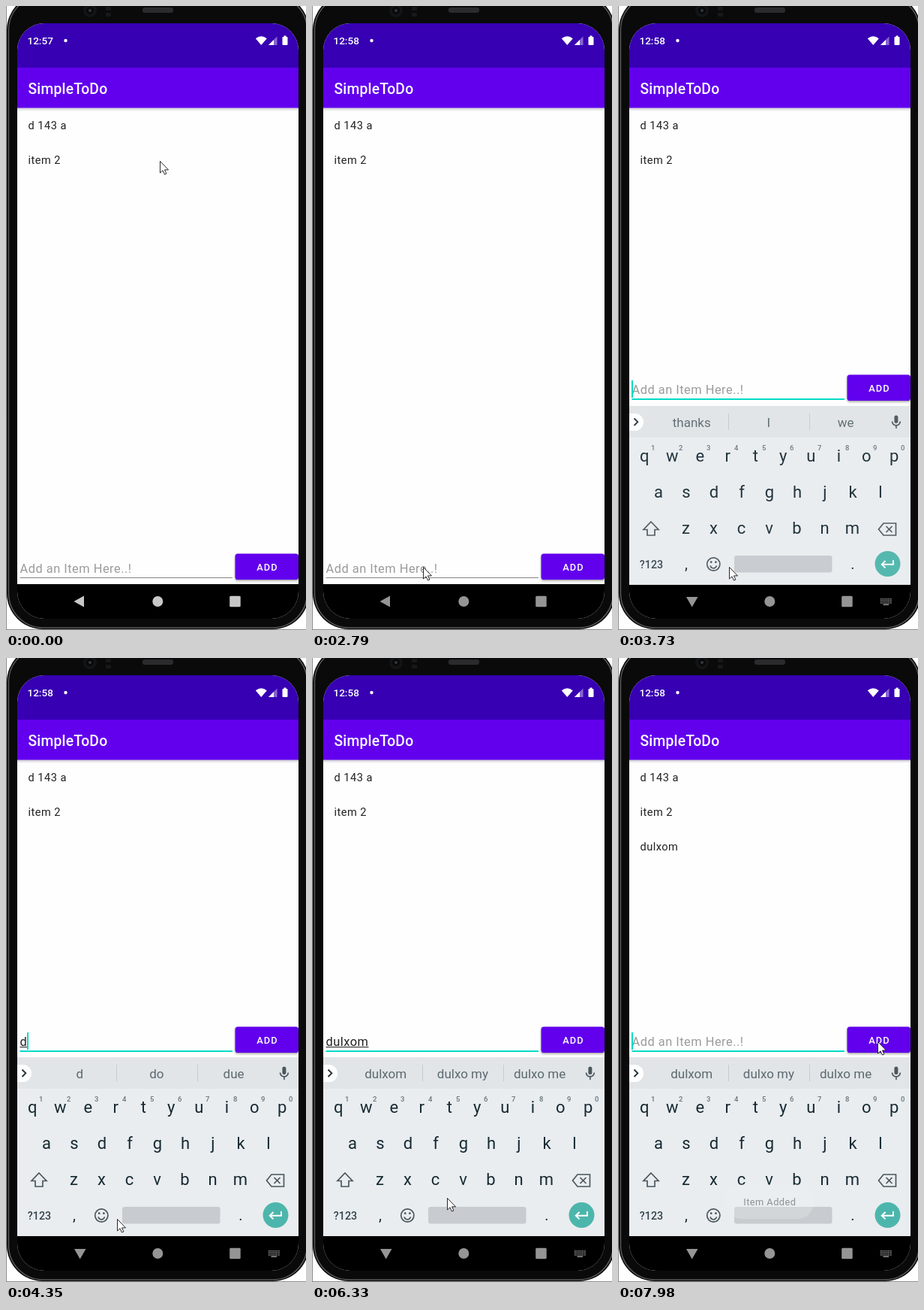
An HTML page with a canvas that plays this animation: 400 px wide and 830 px high, repeating every 8000 ms.

```html
<!DOCTYPE html>
<html lang="en">
<head>
<meta charset="utf-8">
<title>To-do demo</title>
<style>
  html, body { margin: 0; width: 100%; height: 100%; overflow: hidden; background: #fff; }
  canvas { display: block; width: 400px; height: 830px; }
</style>
</head>
<body>
<canvas id="stage"></canvas>
<script>
const LOOP = 8000, W = 400, H = 830;
const PURPLE = '#6200ee', TEAL = '#03dac5', INK = '#172a33', ICON = '#4b575e';
const WORD = 'dulxom', NAME = 'Dulxo';
const FOCUS = 3320, LIFT = 3450, NAV_SWAP = 3590, KEYBOARD = 3730, SETTLED = 3850;
const TYPE_START = 4350, KEY_GAP = 257, BLINK = 475, PRESS = 7600, ADDED = 7740;

const canvas = document.getElementById('stage');
const c = canvas.getContext('2d');
const dpr = window.devicePixelRatio || 1;
canvas.width = W * dpr;
canvas.height = H * dpr;

const pointerStart = [205, 206];
const pointerLegs = [
  { start: 880, end: 1820, steps: 8, via: [145, 560], to: [145, 725] },
  { start: 2100, end: 2370, steps: 3, via: [147, 728], to: [148, 731] },
  { start: 2790, end: 2790, steps: 1, via: [148, 738], to: [148, 746] },
  { start: 6330, end: 7080, steps: 7, via: [445, 485], to: [346, 510] }
];

// Progress in equal jumps: the first lands at start, the last at end.
function stepped(t, start, end, steps) {
  if (t < start) return 0;
  if (t >= end) return 1;
  return (Math.floor((t - start) / (end - start) * (steps - 1)) + 1) / steps;
}

const smooth = p => p * p * (3 - 2 * p);
const curve = (a, b, d, p) => a * (1 - p) ** 2 + 2 * b * p * (1 - p) + d * p * p;

function pointerAt(t) {
  return pointerLegs.reduce((from, leg) => {
    const p = smooth(stepped(t, leg.start, leg.end, leg.steps));
    return from.map((v, i) => Math.round(curve(v, leg.via[i], leg.to[i], p)));
  }, pointerStart);
}

function keysTyped(t) {
  const count = Math.floor((t - TYPE_START) / KEY_GAP) + 1;
  return Math.max(0, Math.min(WORD.length, count));
}

function caretVisible(t) {
  if (t < FOCUS) return false;
  const count = keysTyped(t);
  let last = count ? TYPE_START + KEY_GAP * (count - 1) : FOCUS;
  if (t >= ADDED) last = ADDED;
  return Math.floor((t - last) / BLINK) % 2 === 0;
}

function suggestionsFor(count) {
  const typed = WORD.slice(0, count);
  if (!count) return ['thanks', 'I', 'we'];
  if (count < 4) return [typed, 'do', 'due'];
  if (count < 6) return [typed, NAME, 'dive'];
  return [typed, 'dulxo my', 'dulxo me'];
}

function rect(x, y, w, h, color, r = 0) {
  c.fillStyle = color;
  c.beginPath();
  c.roundRect(x, y, w, h, r);
  c.fill();
}

function disc(x, y, r, color) {
  c.fillStyle = color;
  c.beginPath();
  c.arc(x, y, r, 0, Math.PI * 2);
  c.fill();
}

function arc(x, y, r, from, to) {
  c.strokeStyle = ICON;
  c.lineWidth = 1.7;
  c.beginPath();
  c.arc(x, y, r, from, to);
  c.stroke();
}

function path(points, close) {
  c.beginPath();
  points.forEach(([x, y]) => c.lineTo(x, y));
  if (close) c.closePath();
}

function poly(points, color) {
  path(points, true);
  c.fillStyle = color;
  c.fill();
}

function line(points, color, width, close) {
  path(points, close);
  c.strokeStyle = color;
  c.lineWidth = width;
  c.stroke();
}

function text(s, x, y, size, color, { weight = 400, spacing = 0, align = 'left' } = {}) {
  c.font = `${weight} ${size}px Roboto, sans-serif`;
  c.letterSpacing = spacing + 'px';
  c.textAlign = align;
  c.fillStyle = color;
  c.fillText(s, x, y);
  return c.measureText(s).width;
}

function device() {
  rect(0, 0, W, H, '#fff');
  rect(0, 0, 1, H, '#8c8c8c');
  rect(0, 829, W, 1, '#8c8c8c');
  rect(1, -16, 403, 845, '#0a0a0b', 48);
  c.strokeStyle = '#57585a';
  c.lineWidth = 1.5;
  c.beginPath();
  c.roundRect(3.5, -14, 398, 841, 46);
  c.stroke();
  disc(112, 6, 9, '#131416');
  disc(112, 6, 5, '#08090b');
  disc(112, 6, 2, '#34373b');
  for (const y of [1, 9]) rect(133, y, 7, 5, '#17181a', 1);
  rect(182, 2, 41, 7, '#2b2b2d', 3);
}

function statusBar(t) {
  rect(15, 23, 375, 60, '#3700b3');
  text(t < 2235 ? '12:57' : '12:58', 28.4, 51.3, 13.6, '#fff', { weight: 500 });
  disc(79.5, 46, 2.2, '#fff');
  c.fillStyle = '#fff';
  c.beginPath();
  c.moveTo(340.3, 52);
  c.lineTo(332.8, 43.3);
  c.quadraticCurveTo(340.3, 37.2, 347.8, 43.3);
  c.fill();
  poly([[350, 52], [361.5, 52], [361.5, 40.5]], '#8866d1');
  poly([[350, 52], [357, 52], [357, 45]], '#fff');
  rect(368.5, 41, 7, 11, '#fff', 1);
  rect(370.5, 39.5, 3, 2, '#fff');
}

function appBar() {
  const shade = c.createLinearGradient(0, 135, 0, 140);
  shade.addColorStop(0, '#c6c3cc');
  shade.addColorStop(1, '#fff');
  rect(15, 135, 375, 5, shade);
  rect(15, 82, 375, 53.5, PURPLE);
  text('SimpleToDo', 29.5, 116.5, 19.3, '#fff', { weight: 500, spacing: .2 });
}

function inputRow(t) {
  const typed = t < ADDED ? WORD.slice(0, keysTyped(t)) : '';
  const y = t < LIFT ? 238 : 0;
  const focused = t >= FOCUS;
  const style = { spacing: .5 };
  let end = 18.5;
  if (typed) {
    const width = text(typed, 18.5, 515.5, 16.4, '#202020', style);
    rect(18.5, 517, width, 1, '#202020');
    end += width;
  } else {
    text('Add an Item Here..!', 18.5, 515.5 + y, 16.4, '#9b9b9b', style);
  }
  rect(18.5, 522 + y, 283.5, focused ? 2 : 1, focused ? TEAL : '#868686');
  if (caretVisible(t)) rect(Math.round(end - .5), 498, 2, 23, TEAL);

  c.save();
  c.shadowColor = 'rgba(0,0,0,.38)';
  c.shadowBlur = 3 * dpr;
  c.shadowOffsetY = 1.5 * dpr;
  rect(305.5, 490.5 + y, 84.5, 34.5, PURPLE, 3.6);
  c.restore();
  const press = stepped(t, PRESS, 7980, 4);
  if (press) rect(305.5, 490.5 + y, 84.5, 34.5, `rgba(255,255,255,${.25 * (1 - press)})`, 3.6);
  text('ADD', 348.5, 513 + y, 12.8, '#fff', { weight: 500, spacing: 1.14, align: 'center' });
}

function suggestions(words) {
  rect(15, 531, 375, 42, '#e1e5e8');
  rect(0, 541, 34, 23, '#fff', 11.5);
  line([[21.5, 547.5], [26.3, 552.3], [21.5, 557]], '#26343b', 1.9);
  words.forEach((word, i) => {
    const strong = word === NAME;
    text(word, 98.2 + i * 102.7, 559, 17, strong ? '#000' : '#5c696f',
      { weight: strong ? 700 : 400, align: 'center' });
  });
  for (const x of [147, 255]) rect(x, 541, 1, 22, '#c5cbce');
  rect(368.4, 543.5, 5, 10.5, ICON, 2.5);
  arc(370.9, 551.5, 5.4, 0, Math.PI);
  rect(370.1, 557, 1.6, 4, ICON);
}

function keyRow(keys, x, y, size = 22, color = INK, weight = 400) {
  [...keys].forEach((key, i) => text(key, x + i * 37, y, size, color, { weight, align: 'center' }));
}

function keyboard(words) {
  rect(15, 531, 375, 238, '#e9edf0');
  suggestions(words);
  keyRow('qwertyuiop', 35.3, 604.5);
  keyRow('asdfghjkl', 54, 652.5);
  keyRow('zxcvbnm', 90.5, 700.5);
  keyRow('1234567890', 46.7, 590, 9.5, '#67747b', 500);

  line([[44, 685], [54, 695.5], [49, 695.5], [49, 703], [39, 703], [39, 695.5], [34, 695.5]],
    ICON, 1.7, true);
  line([[347.5, 695], [354, 687], [370.5, 687], [370.5, 703], [354, 703]], ICON, 1.7, true);
  for (const d of [-4, 4]) line([[361.5 - d, 691], [361.5 + d, 699]], ICON, 1.7);

  text('?123', 44.5, 746.5, 14.3, '#33434b', { weight: 500, align: 'center' });
  keyRow(',', 91, 748, 20);
  keyRow('.', 313, 748, 20);
  arc(127.3, 741.5, 8.6, 0, Math.PI * 2);
  arc(127.3, 742.5, 4.3, .2, Math.PI - .2);
  for (const d of [-3.1, 3.1]) disc(127.3 + d, 738.7, 1.4, ICON);
  rect(155, 730, 130.5, 22.5, '#c8ccd0', 3);
  disc(359.5, 741, 17, '#4db6ac');
  line([[367, 736], [367, 741.7], [352.5, 741.7]], '#fff', 2);
  line([[356.5, 737], [351.8, 741.7], [356.5, 746.4]], '#fff', 2);
}

function navBar(t) {
  const level = Math.round(200 - 51 * stepped(t, 120, 510, 3));
  const tone = `rgb(${level},${level},${level})`;
  const open = t >= NAV_SWAP;
  rect(15, 769, 375, 46, '#000');
  poly(open ? [[91, 786], [106.5, 786], [98.7, 799.5]] : [[104, 784.5], [104, 799.5], [90.5, 792]], tone);
  disc(202.3, 792, 7, tone);
  rect(298.2, 784.8, 14.5, 14.4, tone, 1.5);
  if (!open) return;
  for (let i = 0; i < 18; i++)
    rect(350 + i % 6 * 2.6, 788 + Math.floor(i / 6) * 2.6, 1.6, 1.6, tone);
  rect(353.5, 795.6, 7.5, 1.4, tone);
}

function toast(t) {
  c.save();
  c.globalAlpha = .5 * stepped(t, 7860, 7980, 2);
  rect(143, 700, 118, 46, 'rgba(238,238,238,.55)', 22);
  text('Item Added', 202.3, 728, 12.8, '#34383b', { spacing: .45, align: 'center' });
  c.restore();
}

function arrow(x, y) {
  c.save();
  c.translate(x + .5, y + .5);
  const shape = [[0, 0], [0, 15.5], [3.5, 12.3], [6, 17.5], [8.4, 16.5], [6, 11.4], [11, 11.4]];
  poly(shape, '#fff');
  line(shape, '#111', .9, true);
  c.restore();
}

function draw(t) {
  c.setTransform(dpr, 0, 0, dpr, 0, 0);
  device();
  c.save();
  c.beginPath();
  c.roundRect(15, 23, 375, 792, 36);
  c.clip();
  rect(15, 23, 375, 792, '#fefefe');
  statusBar(t);
  appBar();
  const items = ['d 143 a', 'item 2'];
  if (t >= ADDED) items.push(WORD);
  items.forEach((item, i) => text(item, 29.6, 164.3 + i * 46, 14.6, '#212121', { spacing: .456 }));
  inputRow(t);
  navBar(t);
  if (t >= KEYBOARD) {
    c.save();
    if (t < SETTLED) {
      c.globalAlpha = .95;
      c.translate(0, 1);
    }
    keyboard(suggestionsFor(keysTyped(t)));
    c.restore();
  }
  toast(t);
  c.restore();
  arrow(...pointerAt(t));
}

const start = performance.now();
function tick() {
  draw((performance.now() - start) % LOOP);
  requestAnimationFrame(tick);
}
tick();
</script>
</body>
</html>
```
